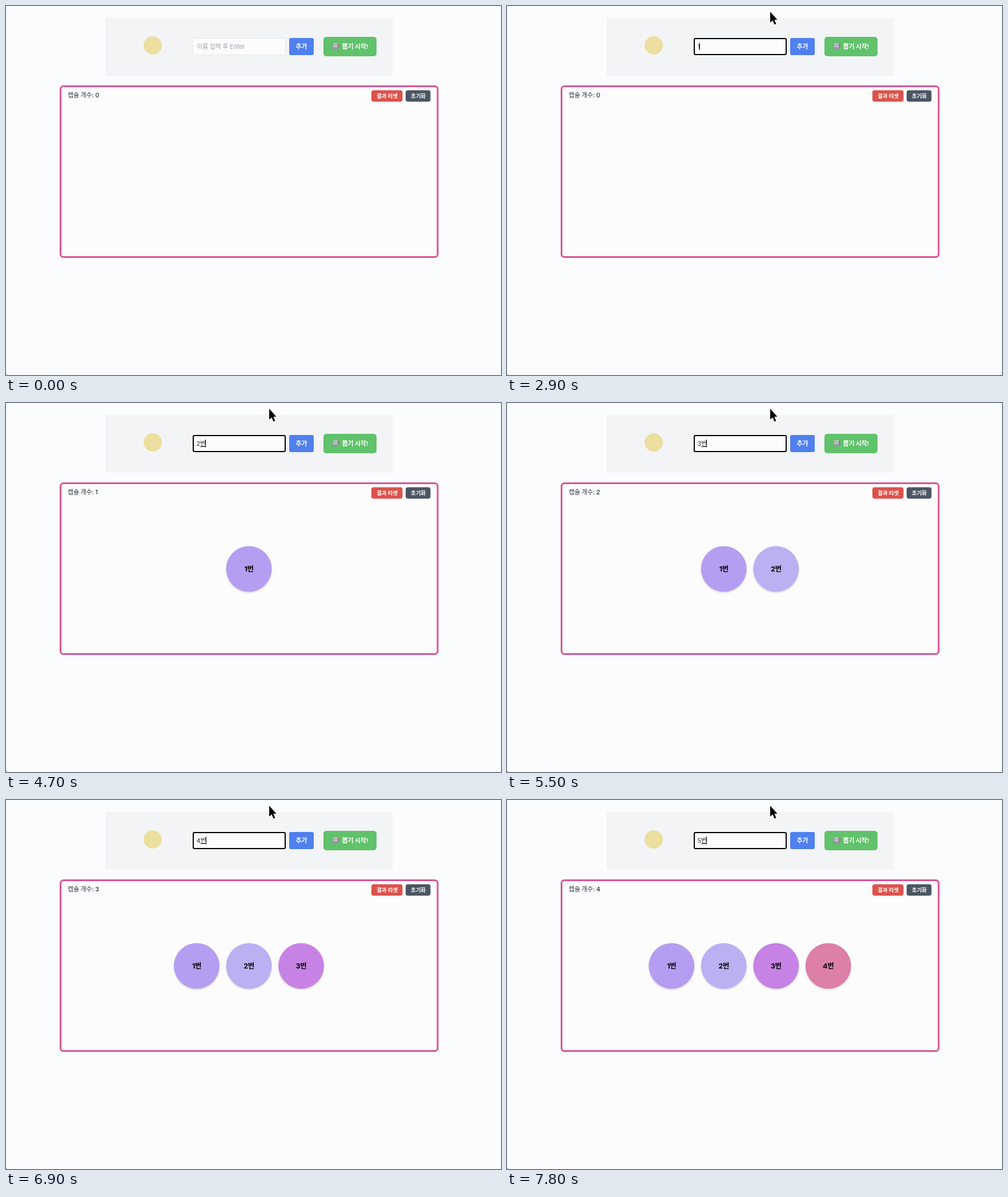
Write an HTML page that moves like this. It is 867 px wide and 646 px high and loops after 8000 ms.

```html
<!DOCTYPE html>
<html lang="ko">
<head>
<meta charset="utf-8">
<title>캡슐 뽑기</title>
<style>
html, body { margin: 0; width: 100%; height: 100%; overflow: hidden; background: #fbfcfd; }
svg { display: block; width: 867px; height: 646px; }
text { font: 11px Inter, "Noto Sans CJK KR", "Noto Sans CJK", sans-serif; letter-spacing: -.02em; fill: #2b3240; }
.mid { text-anchor: middle; }
.button { font-weight: 600; fill: #fff; }
.small { font-size: 9.6px; }
.ball { filter: drop-shadow(0 2px 1.5px rgb(0 0 0 / .13)); }
.name { font-size: 12.4px; font-weight: 700; fill: #000; }
</style>
</head>
<body>
<svg viewBox="0 0 867 646">
  <rect x="174" y="21" width="503.500" height="101" fill="#f3f4f6"/>
  <circle cx="257" cy="69" r="16" fill="#ecdf9f"/>

  <rect id="field" rx="2" fill="#fcfcfd"/>
  <text id="hint" x="334" y="74.500" style="fill:#9ca3af">이름 입력 후 Enter</text>
  <text id="typed" x="333.500" y="74.500" style="fill:#333"></text>
  <path id="underline" stroke="#333"/>
  <path id="caret" stroke="#111"/>

  <rect x="496" y="56" width="43" height="30" rx="3" fill="#4f80ee"/>
  <text class="mid button" x="517.500" y="74.500">추가</text>
  <rect x="556" y="54" width="93" height="34" rx="5" fill="#60c26a"/>
  <g>
    <rect x="572" y="66" width="10" height="10" rx="1.500" fill="#8b8795"/>
    <rect x="573" y="65.500" width="8" height="2.500" rx="1" fill="#c9c5d2"/>
    <rect x="573" y="69" width="8" height="3" fill="#eeeaf5"/>
    <path d="M574.500 70.500h1.500m1 0h1.500m1 0h1" stroke="#7858a5" stroke-width="1.500"/>
    <path d="M573.500 74h7" stroke="#c7bdd0"/>
    <path d="M583 68v5" stroke="#77727e"/>
    <circle cx="583" cy="67.500" r="1" fill="#d65353"/>
  </g>
  <text class="button" x="588.500" y="74.500">뽑기 시작!</text>

  <rect x="95.500" y="140.500" width="660.500" height="299" rx="5" fill="#fcfcfd" stroke="#db5393" stroke-width="3"/>
  <text id="count" x="108" y="159.500" font-weight="500" style="font-weight:500"></text>
  <rect x="640" y="147.500" width="54.500" height="20" rx="4" fill="#dd524c"/>
  <text class="mid button small" x="667.500" y="161">결과 리셋</text>
  <rect x="700" y="147.500" width="43.500" height="20" rx="4" fill="#4b5563"/>
  <text class="mid button small" x="722" y="161">초기화</text>

  <g id="balls"></g>
  <path d="M0 643Q0 646 3 646H0Z" fill="#777"/>
  <path id="arrow" d="M0 0V19L4.300 15.200 7.500 22.500 10.400 21.200 7.300 14H12.500Z" stroke="#fff" stroke-width="1.500" paint-order="stroke"/>
  <path id="beam" d="M-2.500-7Q0-7 0-5V5Q0 7-2.500 7M2.500-7Q0-7 0-5V5Q0 7 2.500 7" fill="none" stroke="#222"/>
</svg>
<script>
const $ = id => document.getElementById(id);
const set = (el, attrs) => { for (const k in attrs) el.setAttribute(k, attrs[k]); };
const show = (el, on) => { el.style.display = on ? '' : 'none'; };

// [time, field text]; an empty text means the entry was submitted
const typing = [
  [2900, '1'], [3400, '1ㅂ'], [3600, '1번'], [3800, ''],
  [4100, '2'], [4400, '2ㅂ'], [4600, '2버'], [4700, '2번'], [4800, ''],
  [5000, '3'], [5200, '3ㅂ'], [5400, '3버'], [5500, '3번'], [5600, ''],
  [6100, '4'], [6600, '4ㅂ'], [6800, '4버'], [6900, '4번'], [7000, ''],
  [7200, '5'], [7500, '5ㅂ'], [7800, '5번']
];
const focusAt = 600;

const balls = ['#b59df1', '#bab0f2', '#c683e5', '#dc7fa9'].map((color, i) => {
  const g = document.createElementNS('http://www.w3.org/2000/svg', 'g');
  g.innerHTML = `<circle class="ball" r="40" fill="${color}"/><text class="mid name" y="4.500">${i + 1}번</text>`;
  $('balls').append(g);
  return g;
});

function pointerAt(t) {
  if (t >= 1100) return [461, 10];
  if (t >= 1000) return [452, 36];
  const left = (1 - Math.min(1, (t - 100) / 500)) ** 2;
  return [440 + 371 * left, 66 - 39 * left];
}

function drawPointer(t) {
  const [x, y] = pointerAt(t);
  const overField = x < 490 && y > 56;
  for (const id of ['arrow', 'beam']) set($(id), { transform: `translate(${x} ${y})` });
  show($('arrow'), t >= 100 && !overField);
  show($('beam'), t >= 100 && overField);
}

function drawField(t, text) {
  const focused = t >= focusAt;
  set($('field'), focused
    ? { x: 328, y: 57, width: 161, height: 28, stroke: '#000', 'stroke-width': 2 }
    : { x: 327.5, y: 56.5, width: 162, height: 29, stroke: '#e5e7eb', 'stroke-width': 1 });
  show($('hint'), !text);
  $('typed').textContent = text;
  const end = text ? 333.5 + $('typed').getComputedTextLength() : 333.5;
  const start = text.length > 1 ? 333.5 + $('typed').getSubStringLength(0, 1) : end;
  set($('underline'), { d: `M${start} 76.500H${end}` });
  show($('underline'), text.length > 1);
  set($('caret'), { d: `M${Math.floor(end) + .5} 64V77.500` });
  show($('caret'), focused && (t < 1100 || t >= 1500 && t < 2000 || t >= 2400));
}

function drawBalls(n) {
  $('count').textContent = '캡슐 개수: ' + n;
  balls.forEach((ball, i) => {
    show(ball, i < n);
    set(ball, { transform: `translate(${425.5 + (i - (n - 1) / 2) * 91.5} 290.500)` });
  });
}

function draw(now) {
  const t = Math.floor(now % 8000 / 100) * 100;
  const past = typing.filter(([at]) => at <= t);
  drawPointer(t);
  drawField(t, past.length ? past[past.length - 1][1] : '');
  drawBalls(past.filter(([, text]) => !text).length);
}

const began = performance.now();
function loop() {
  draw(performance.now() - began);
  requestAnimationFrame(loop);
}
loop();
</script>
</body>
</html>
```
